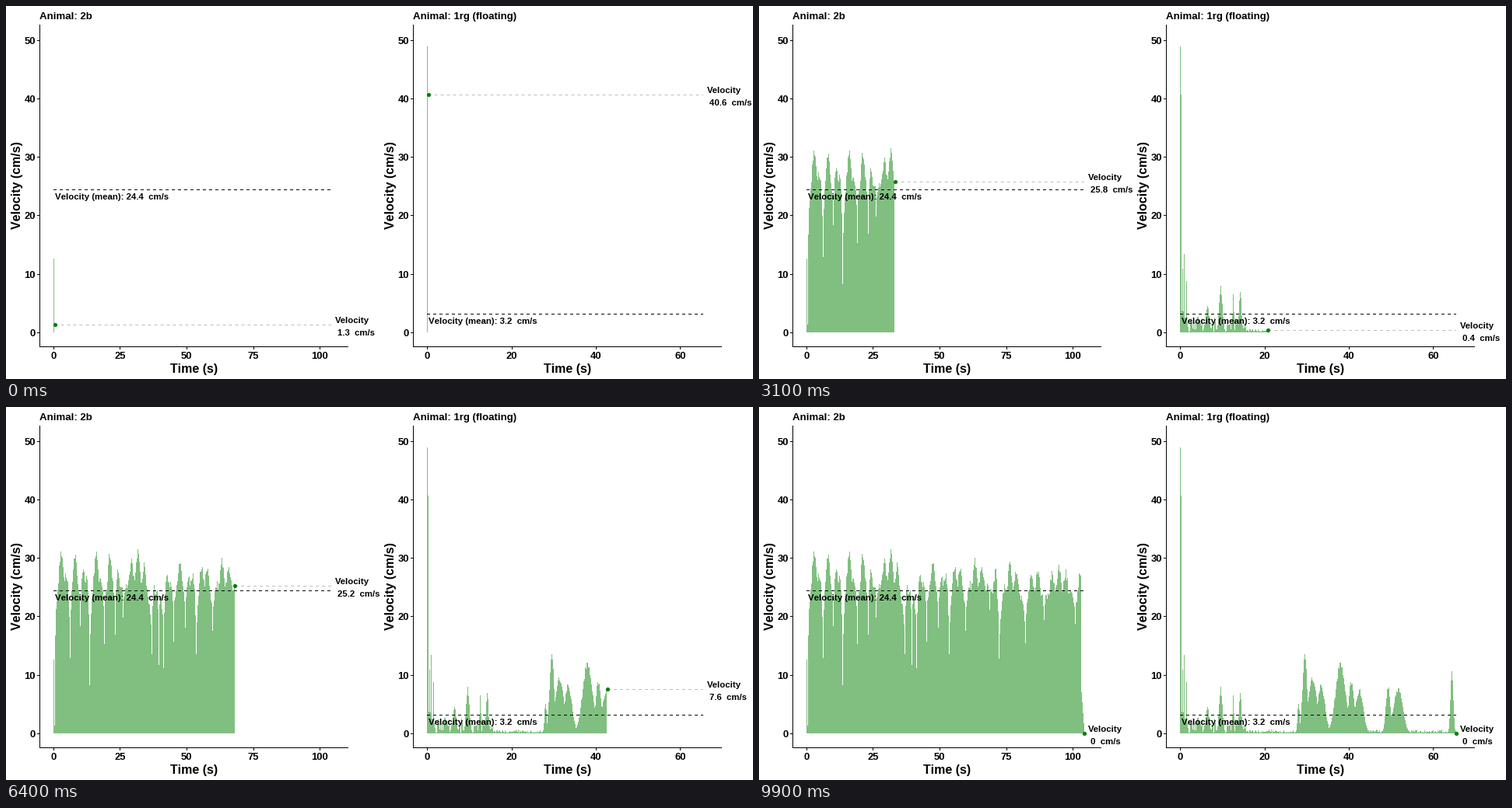
These frames come from a looping animation (960x480 px, 10000 ms). A matplotlib script:

```python
import numpy as np
import matplotlib.pyplot as plt
from matplotlib.animation import FuncAnimation

W, H, DPI = 960, 480, 80
PT = 72 / DPI                      # points per pixel
FRAMES, INTERVAL = 100, 100
BASE, UNIT = 420, 7.53             # pixel row of zero, pixels per cm/s
GREEN, BAR, GUIDE = "#008000", "#80bf80", "#bebebe"

plt.rcParams["font.family"] = "Liberation Sans"
plt.rcParams["font.weight"] = "bold"
plt.rcParams["text.kerning_factor"] = 6

# Slow moments of the swimming animal: (pixels after t = 0, velocity)
LULLS = [(1, 8), (21, 13.6), (34, 18.6), (46, 8.3), (65, 16), (79, 17.6),
         (89, 20), (126, 14), (135, 12.2), (141, 11.8), (154, 16.4),
         (169, 19), (183, 13.7), (204, 18.5), (235, 22), (247, 13),
         (281, 16), (305, 20), (345, 19), (358, 16)]

# Bursts of the floating animal: (pixels after t = 0, velocity, half width)
BURSTS = [(3, 11, 1), (5, 13.6, 0.8), (8, 9.3, 0.8), (35, 4.8, 3),
          (52, 8.1, 3), (68, 7, 1.2), (77, 7.8, 2), (152, 5.4, 2),
          (160, 14.6, 4), (170, 9.7, 8), (181, 8.5, 7), (206, 12.6, 9),
          (220, 9.5, 5), (230, 7.8, 7), (267, 8.5, 4), (280, 8, 8),
          (349, 11.7, 2.5)]


def swim(n=357):
    """Humps between lulls: long ones rise higher, late ones lower."""
    t = np.arange(n + 1)
    at, low = np.array(LULLS).T
    k = np.clip(np.searchsorted(at, t, side="right") - 1, 0, len(at) - 2)
    width = np.diff(at)[k]
    u = np.clip((t - at[k]) / width, 0, 1)
    crest = 33 - 5 * np.exp((6 - width) / 4) - t / 90
    floor = np.interp(t, at, low)
    v = floor + (crest - floor) * np.sqrt(np.sin(np.pi * u))
    v *= 1 - 0.14 * np.sin(np.pi * t / 9) ** 2 * np.sin(np.pi * u)
    v *= 1 - 0.06 * np.random.default_rng(4).random(n + 1)
    v[:2] = 12.6, 1.3
    v[-5:] = np.linspace(7, 0, 5)
    return v


def drift(n=355):
    """Weak flutter that calms down, with bell-shaped bursts on top."""
    t = np.arange(n + 1)
    rng = np.random.default_rng(9)
    v = 0.15 + np.where(t < 85, 2.6, 0.5) * rng.random(n + 1) ** 1.5
    for at, peak, width in BURSTS:
        v = np.maximum(v, peak * np.exp(-((t - at) / width) ** 2))
    v *= 1 - 0.12 * rng.random(n + 1)
    v[:2] = 48.9, 40.6
    v[-1] = 0
    return v


fig = plt.figure(figsize=(W / DPI, H / DPI), dpi=DPI, facecolor="white")
ax = fig.add_axes([0, 0, 1, 1])
ax.set(xlim=(0, W), ylim=(H, 0))
ax.axis("off")


def mid(p):
    """Centre of the pixel at p, for crisp one-pixel lines."""
    return np.round(p) + 0.5


def line(x, y, color="black", z=3, **kw):
    return ax.plot(x, y, color=color, lw=PT, solid_capstyle="butt",
                   dash_capstyle="butt", snap=False, zorder=z, **kw)[0]


def text(x, y, s, px, ha="left", **kw):
    return ax.text(x, y, s, fontsize=px * PT, ha=ha, va="baseline",
                   zorder=5, **kw)


class Panel:
    def __init__(self, left, title, trace, mean, scale, ticks, step):
        self.x0 = left + 18
        self.step = step
        self.trace = trace
        self.length = len(trace) - 1
        self.end = self.x0 + self.length
        self.draw_axes(left, title, scale, ticks)

        edges = self.x0 + np.arange(self.length + 1)
        self.right = edges[1:]
        self.tops = BASE - UNIT * trace[:-1]
        self.bars = ax.stairs(self.tops, edges, baseline=BASE, fill=True,
                              color=BAR, lw=0, antialiased=False, zorder=1)

        y = mid(BASE - UNIT * mean)
        line([self.x0, self.end], [y, y], dashes=(4, 4))
        text(self.x0 + 1.6, y + 12.5, f"Velocity (mean): {mean}  cm/s", 11.38)

        self.guide = line([], [], GUIDE, 2, dashes=(4, 4))
        self.dot = ax.plot([], [], "o", color=GREEN, ms=5.2 * PT, mew=0, zorder=6)[0]
        self.name = text(self.end + 5, 0, "Velocity", 11.38)
        self.value = text(self.end + 8, 0, "", 11.38)

    def draw_axes(self, left, title, scale, ticks):
        line([left + 0.5] * 2, [24, 439])
        line([left, left + 397], [438.5] * 2)
        for v in range(0, 51, 10):
            y = mid(BASE - UNIT * v)
            line([left - 3, left], [y, y])
            text(left - 5, y + 4.8, str(v), 13, "right")
        for v in ticks:
            x = self.x0 + scale * v
            line([mid(x)] * 2, [439, 442])
            text(x, 454, str(v), 13, "center")
        text(left, 17, title, 13.2)
        text(left + 198.5, 472, "Time (s)", 16, "center")
        text(left - 24, 230.5, "Velocity (cm/s)", 16, "center",
             rotation=90, rotation_mode="anchor")

    def update(self, i):
        pos = min(1.5 + self.step * i, self.length)
        v = self.trace[int(pos)]
        x, y = self.x0 + pos, BASE - UNIT * v
        self.bars.set_data(values=np.where(self.right <= x, self.tops, BASE))
        self.guide.set_data([x, self.end], [mid(y)] * 2)
        self.dot.set_data([x], [y])
        self.name.set_y(y - 2)
        self.value.set_y(y + 14)
        self.value.set_text(f" {v:.1f}".removesuffix(".0").strip() + "  cm/s")


panels = [
    Panel(43, "Animal: 2b", swim(), 24.4, 3.42, range(0, 101, 25), 3.62),
    Panel(523, "Animal: 1rg (floating)", drift(), 3.2, 5.425, range(0, 61, 20), 3.6),
]


def draw(i):
    for p in panels:
        p.update(i)


anim = FuncAnimation(fig, draw, frames=FRAMES, interval=INTERVAL, repeat=True)
plt.show()
```
